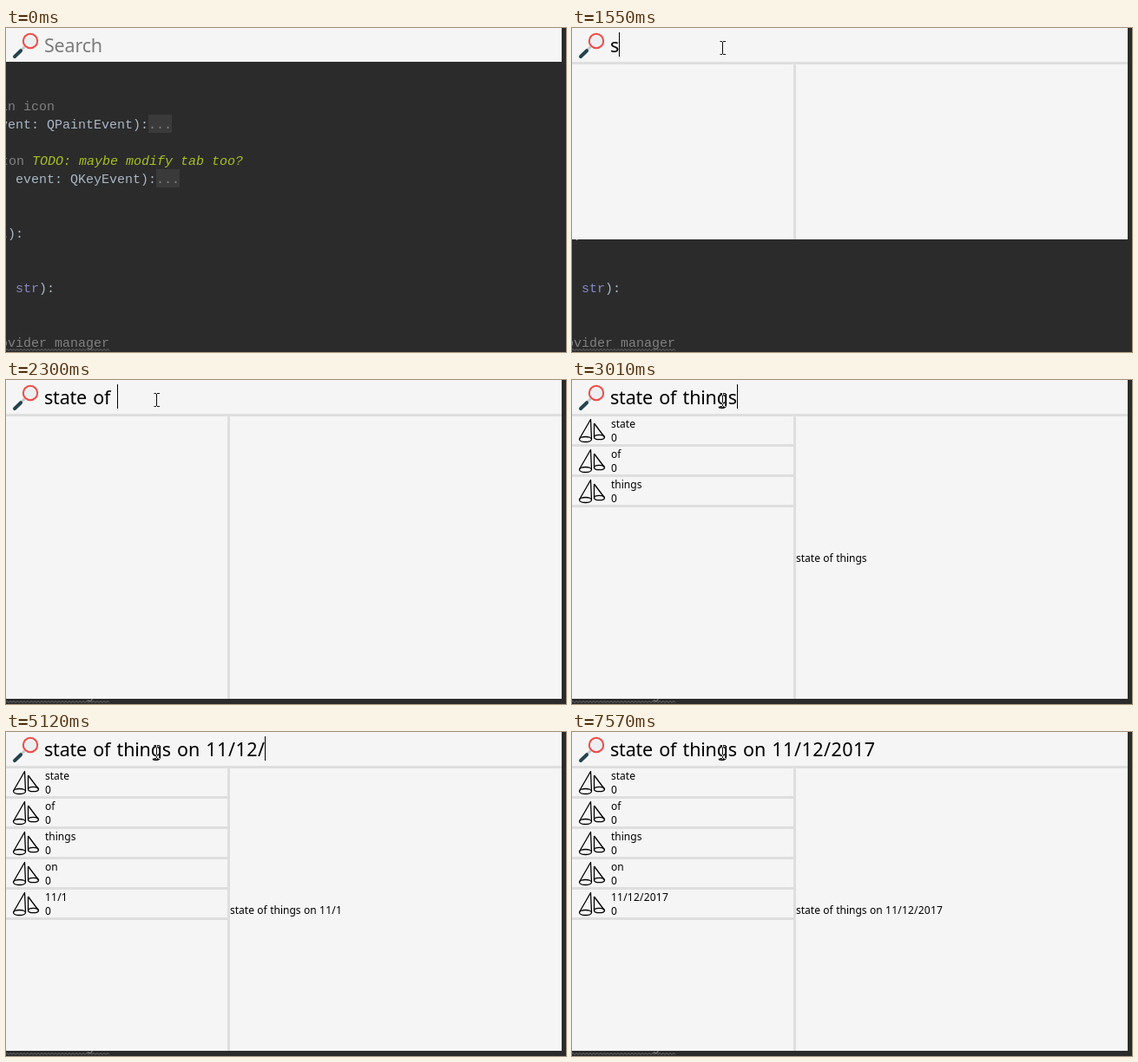
Animation, 645 px wide and 374 px high, one loop 8 s. Source, as an HTML page:

```html
<!DOCTYPE html>
<html lang="en">
<head>
<meta charset="utf-8">
<title>Search launcher</title>
<style>
  html, body { margin: 0; width: 100%; height: 100%; overflow: hidden; background: #2b2b2b; }
  svg { display: block; width: 645px; height: 374px; }
  text { white-space: pre; }
  .code { font: 15px "Liberation Mono", "DejaVu Sans Mono", monospace; fill: #a9b7c6; }
  .code .note { fill: #808080; }
  .code .todo { fill: #a8c023; font-style: italic; }
  .code .type { fill: #8888c6; }
  .fold { fill: #3a3a3a; }
  .ui { font: 12px "Noto Sans", "Open Sans", sans-serif; word-spacing: .3px; }
  .ui .num { letter-spacing: .22px; }
  .query { font-size: 21.5px; letter-spacing: -.2px; word-spacing: 1.9px; }
  .query .num { letter-spacing: .5px; }
  .hint { fill: #7c7c7c; }
  .pale { fill: #f5f5f5; }
  .line { fill: #dedede; }
  .cones { fill: none; stroke: #000; stroke-width: 1.3; stroke-linejoin: round; }
  #mouse { fill: none; stroke: #fff; mix-blend-mode: difference; }
</style>
</head>
<body>
<svg viewBox="0 0 645 374">
  <defs>
    <g id="cones" class="cones">
      <path d="M8.5 26L21.5 3.5L22.5 26M25.5 8V24M25.5 8L37.5 24"/>
      <ellipse cx="15.5" cy="26.5" rx="7" ry="3"/>
      <ellipse cx="31.5" cy="24" rx="6" ry="2.7"/>
    </g>
  </defs>

  <g class="code">
    <rect class="fold" x="164" y="100" width="27" height="21"/>
    <rect class="fold" x="173" y="163" width="27" height="21"/>
    <text class="note" x="-7" y="95">in icon</text>
    <text x="-7" y="116">vent: QPaintEvent):<tspan class="note">...</tspan></text>
    <text class="note" x="-6" y="158">ton <tspan class="todo">TODO: maybe modify tab too?</tspan></text>
    <text x="11" y="179">event: QKeyEvent):<tspan class="note">...</tspan></text>
    <text x="-7" y="242">t):</text>
    <text x="11" y="305"><tspan class="type">str</tspan>):</text>
    <text class="note" x="-7" y="368">ovider manager</text>
    <path id="wave" fill="none" stroke="#808080" stroke-width=".8"/>
  </g>

  <rect class="pale" width="640" height="39"/>
  <g id="panel">
    <rect class="pale" id="back" y="39" width="640"/>
    <rect class="line" y="39" width="640" height="3"/>
    <rect class="line" id="split" x="255" y="42" width="3"/>
  </g>

  <g fill="none">
    <path d="M21.5 21.5L16 27" stroke="#c3ccd0" stroke-width="3"/>
    <path d="M17 26.2L10 33" stroke="#24434c" stroke-width="4" stroke-linecap="round"/>
    <circle cx="28" cy="15" r="8.2" fill="#eceff1" stroke="#ef4b46" stroke-width="2"/>
  </g>

  <g class="ui">
    <g id="rows"></g>
    <text id="preview" x="258" y="210"></text>
    <text class="query hint" id="hint" x="44" y="28">Search</text>
    <text class="query" id="query" x="44" y="28"></text>
  </g>
  <rect id="caret" y="5" width="1" height="28"/>
  <path id="mouse" d="M-3 -7.5h2.5M.5 -7.5h3M-3 7.5h2.5M.5 7.5h3M0 -7V7"/>
</svg>

<script>
const LOOP = 8000;
const $ = id => document.getElementById(id);

const keys = [
  [1500, 's'], [1630, 't'], [1700, 'a'], [1840, 't'], [1935, 'e'], [2030, ' '],
  [2200, 'o'], [2300, 'f '],
  [2460, 't'], [2520, 'h'], [2585, 'i'], [2650, 'n'], [2710, 'g'], [2850, 's'], [3070, ' '],
  [3510, 'o'], [3560, 'n'], [3700, ' '],
  [4290, '1'], [4440, '1'], [4610, '/'], [4660, '1'], [4960, '2'], [5120, '/'],
  [5520, '2'], [5605, '0'], [5690, '1'], [5920, '7']
];
const base = 'state of things';
const results = [
  [0, ''], [3010, base], [3900, base + ' on'], [4890, base + ' on 11/1'],
  [5330, base + ' on 11/12/'], [5920, base + ' on 11/12/201'], [6130, base + ' on 11/12/2017']
];
const bottoms = [[0, 0], [1550, 244], [1630, 366], [1670, 368]];
const carets = [[0, 0], [610, 1], [1110, 0], [1500, 1], [6520, 0], [7060, 1], [7570, 0]];

const at = (list, t) => list.filter(([start]) => start <= t).pop()[1];

function make(tag, attrs, parent) {
  const el = document.createElementNS('http://www.w3.org/2000/svg', tag);
  for (const name in attrs) el.setAttribute(name, attrs[name]);
  return parent.appendChild(el);
}

// Words and digits have their own spacing.
function write(el, str) {
  if (el.textContent === str) return;
  const [, words, digits] = str.match(/^(\D*)(.*)$/);
  el.textContent = '';
  if (words) make('tspan', {}, el).textContent = words;
  if (digits) make('tspan', { class: 'num' }, el).textContent = digits;
}

const rows = Array.from({ length: 5 }, (_, i) => {
  const g = make('g', { transform: `translate(0 ${42 + 35 * i})` }, $('rows'));
  make('use', { href: '#cones' }, g);
  const label = make('text', { x: 45, y: 13 }, g);
  write(make('text', { x: 45, y: 29 }, g), '0');
  make('rect', { class: 'line', y: 32, width: 255, height: 3 }, g);
  return { g, label };
});

$('wave').setAttribute('d', 'M-1 372.5' + 'l2 -2l2 2'.repeat(30));

const show = (el, on) => el.setAttribute('visibility', on ? 'visible' : 'hidden');

function drawMouse(t) {
  const step = Math.min(4, Math.floor((t - 220) / 40));
  show($('mouse'), step >= 0);
  const left = Math.pow(1 - Math.max(0, step) / 4, 1.4);
  const x = Math.round(173 + 302 * left) + .5;
  const y = Math.round(23 + 314 * left);
  $('mouse').setAttribute('transform', `translate(${x} ${y})`);
}

function draw(t) {
  const typed = keys.filter(([start]) => start <= t).map(k => k[1]).join('');
  write($('query'), typed);
  show($('hint'), !typed);
  const width = typed ? $('query').getComputedTextLength() : 0;
  $('caret').setAttribute('x', Math.round(44 + width));
  show($('caret'), at(carets, t));

  const bottom = at(bottoms, t);
  show($('panel'), bottom);
  $('back').setAttribute('height', Math.max(0, bottom - 39));
  $('split').setAttribute('height', Math.max(0, bottom - 42));

  const found = at(results, t);
  const words = found.split(' ').filter(Boolean);
  write($('preview'), found);
  rows.forEach(({ g, label }, i) => {
    show(g, i < words.length);
    write(label, words[i] || '');
  });
  drawMouse(t);
}

const begin = performance.now();
function tick() {
  draw((performance.now() - begin) % LOOP);
  requestAnimationFrame(tick);
}
tick();
</script>
</body>
</html>
```
